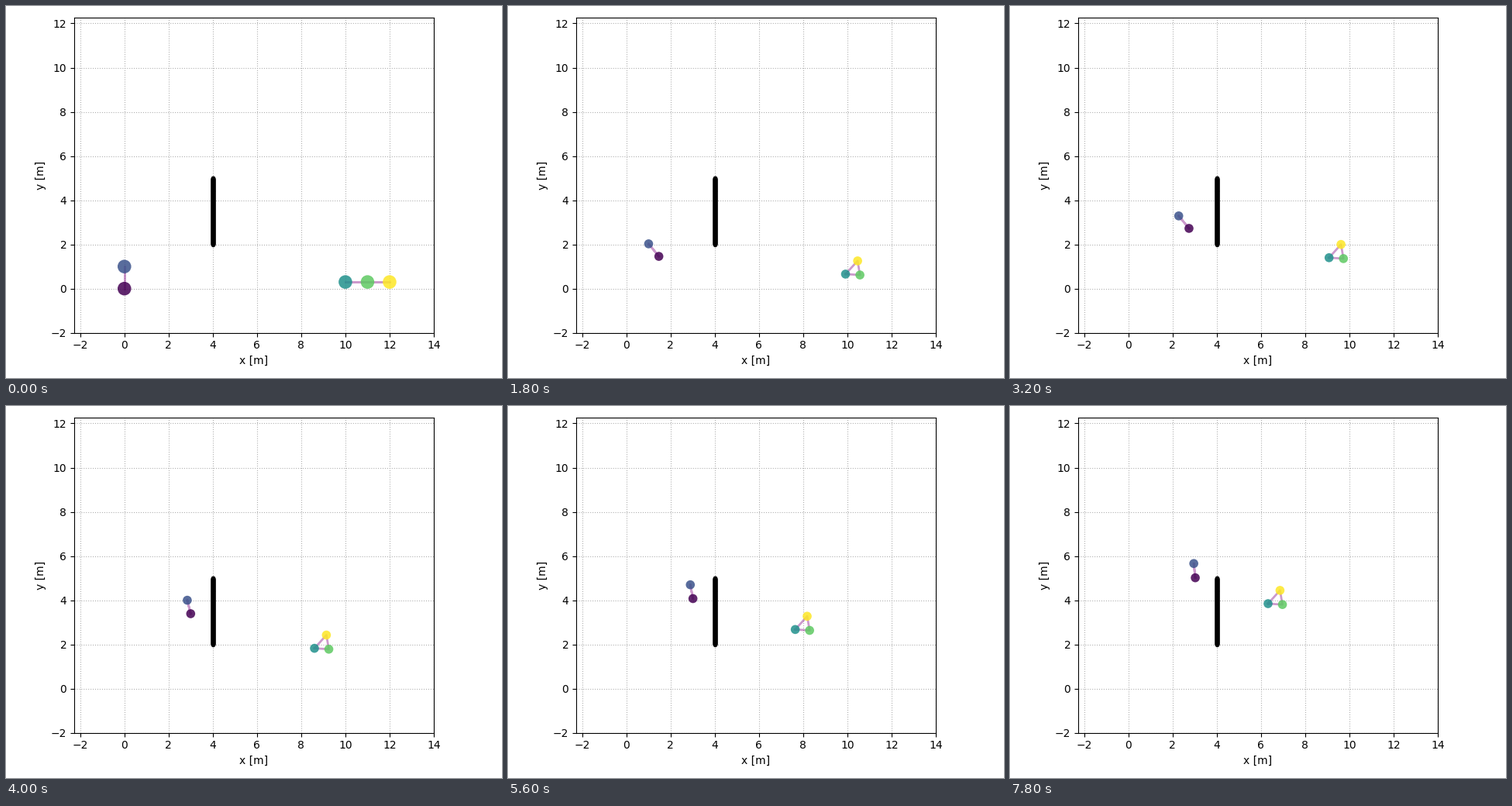
A matplotlib script for the animation above (8 s loop, 640 px wide and 480 px high).

```python
import numpy as np
import matplotlib.pyplot as plt
from matplotlib.animation import FuncAnimation

W, H = 640, 480
STEP = 200      # ms per frame
FRAMES = 40
SCALE = 28.517  # pixels per metre
LEFT, RIGHT, BOTTOM, TOP = 88, 552, 58.28, 465

WALL_X, WALL_Y = 4, (2, 5)

# Each team settles from its start into a formation that moves steadily.
PAIR = np.array([[0, 0], [0, 1]])
PAIR_FORM = np.array([[-0.17, -0.17], [-0.635, 0.395]])
PAIR_SPEED = np.array([0.91, 0.905])
TRIO = np.array([[10, 0.3], [11, 0.3], [12, 0.3]])
TRIO_FORM = np.array([[11, -0.302], [11.65, -0.342], [11.54, 0.298]])
TRIO_SPEED = np.array([-0.6, 0.5317])

# Near the wall the pair stops closing in and slides along it.
SLIDE_POS = np.array([[3.0, 3.39], [2.845, 4.0]])   # at SLIDE_TIME
SLIDE_SPEED = np.array([[0.007, 0.428], [0.03, 0.437]])
SLIDE_TIME = 4


def cruise(start, form, speed, t):
    return form + speed * t + (start - form) * np.exp(-3 * t)


def pair_at(t):
    slide = SLIDE_POS + SLIDE_SPEED * (t - SLIDE_TIME)
    return np.minimum(cruise(PAIR, PAIR_FORM, PAIR_SPEED, t), slide)


def trio_at(t):
    return cruise(TRIO, TRIO_FORM, TRIO_SPEED, t)


fig = plt.figure(figsize=(W / 100, H / 100), dpi=100)
ax = fig.add_axes([LEFT / W, BOTTOM / H,
                   (RIGHT - LEFT) / W, (TOP - BOTTOM) / H])
ax.set_xlim(14 - (RIGHT - LEFT) / SCALE, 14)
ax.set_ylim(-2, -2 + (TOP - BOTTOM) / SCALE)
ax.set_xticks(range(-2, 15, 2))
ax.set_yticks(range(-2, 13, 2))
ax.set_xlabel("x [m]")
ax.set_ylabel("y [m]")
ax.grid(linestyle=":")

ax.plot(np.full(301, WALL_X), np.linspace(*WALL_Y, 301), "k.")
links = [ax.plot([], [], color="purple", alpha=0.4, lw=2, zorder=2)[0]
         for _ in range(2)]
dots = ax.scatter(np.zeros(5), np.zeros(5), c=np.linspace(0, 1, 5),
                  cmap="viridis", alpha=0.85, linewidths=0, zorder=3)


def draw(n):
    t = n * STEP / 1000
    teams = [pair_at(t), trio_at(t)]
    for link, team in zip(links, teams):
        link.set_data(*np.vstack([team, team[:1]]).T)
    dots.set_offsets(np.vstack(teams))
    dots.set_sizes([160 if n == 0 else 70])  # large only at the start
    return [*links, dots]


anim = FuncAnimation(fig, draw, frames=FRAMES, interval=STEP,
                     repeat=True, repeat_delay=0)
plt.show()
```
